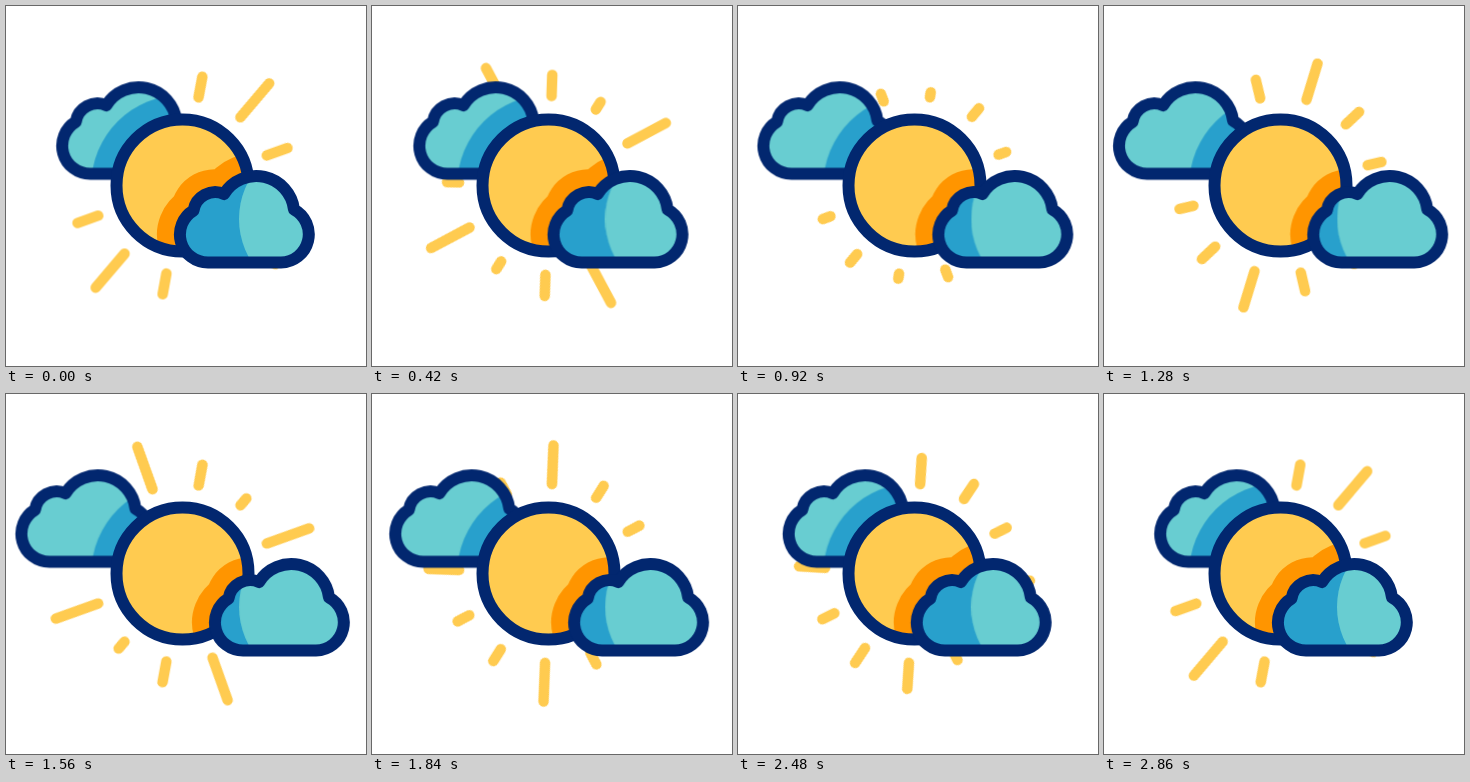
Write an HTML page without scripts that moves like this. It is 360x360 px and loops after 3600 ms.

```html
<!DOCTYPE html>
<html lang="en">
<head>
<meta charset="utf-8">
<title>Partly cloudy</title>
<style>
  html, body { margin: 0; width: 100%; height: 100%; overflow: hidden; background: #fff; }
  svg { display: block; width: 100vw; height: 100vh; }

  .outline { fill: none; stroke: #02276f; stroke-width: 12; stroke-linejoin: round; }
  .ray { stroke: #ffcb50; stroke-width: 10.5; stroke-linecap: round; stroke-dasharray: 50 99; }
  .light { fill: #68cdd1; }
  .blue { fill: #28a0cc; }
  .shade { fill: #ff9500; stroke: #ff9500; stroke-width: 46; stroke-linejoin: round; }

  .spin, .ray, .drift { animation: 3.6s linear infinite; }
  .spin { animation-name: spin; }
  .long { animation-name: long; }
  .far { animation-name: far; }
  .mid { animation-name: mid; }
  .short { animation-name: short; }
  .late { animation-name: late; }
  .drift { animation-name: drift; }
  .right { --x: 36px; }
  .right-back { --x: -36px; }
  .left { --x: -42px; }
  .left-back { --x: 42px; }

  @keyframes drift {
    0% { transform: none; animation-timing-function: cubic-bezier(.35, 0, .65, 1); }
    38.89%, 39.44% { transform: translateX(var(--x)); animation-timing-function: cubic-bezier(.35, 0, .65, 1); }
    77.9%, 100% { transform: none; }
  }
  @keyframes spin {
    0% { transform: rotate(0deg); animation-timing-function: cubic-bezier(.333, .26, .667, .59); }
    11.67% { transform: rotate(21.6deg); animation-timing-function: cubic-bezier(.333, .277, .667, .587); }
    25.56% { transform: rotate(59.5deg); animation-timing-function: cubic-bezier(.333, .305, .667, .692); }
    35.56% { transform: rotate(96.5deg); animation-timing-function: cubic-bezier(.333, .377, .667, .682); }
    43.33% { transform: rotate(120deg); animation-timing-function: cubic-bezier(.333, .385, .667, .774); }
    60% { transform: rotate(161.6deg); animation-timing-function: cubic-bezier(.333, .596, .667, .873); }
    79.44%, 100% { transform: rotate(180deg); }
  }
  /* ray lengths: a larger offset trims the outer end */
  @keyframes long {
    0% { stroke-dashoffset: 5.5; }
    11.67% { stroke-dashoffset: 6.5; }
    15% { stroke-dashoffset: 10; }
    25.56% { stroke-dashoffset: 46; }
    35.56% { stroke-dashoffset: 32; }
    43.33% { stroke-dashoffset: 5; }
    45% { stroke-dashoffset: 4; }
    51% { stroke-dashoffset: 11; }
    60% { stroke-dashoffset: 36; }
    65% { stroke-dashoffset: 42; }
    79.44%, 100% { stroke-dashoffset: 5.5; }
  }
  @keyframes far {
    0% { stroke-dashoffset: 18; }
    11.67% { stroke-dashoffset: 6.5; }
    15% { stroke-dashoffset: 10; }
    25.56% { stroke-dashoffset: 45; }
    35.56% { stroke-dashoffset: 32; }
    43.33% { stroke-dashoffset: 5; }
    60% { stroke-dashoffset: 36; }
    79.44%, 100% { stroke-dashoffset: 18; }
  }
  @keyframes mid {
    0% { stroke-dashoffset: 29; }
    11.67% { stroke-dashoffset: 41; }
    25.56% { stroke-dashoffset: 42; }
    35.56% { stroke-dashoffset: 12; }
    43.33% { stroke-dashoffset: 41; }
    60% { stroke-dashoffset: 32; }
    67% { stroke-dashoffset: 23; }
    79.44%, 100% { stroke-dashoffset: 29; }
  }
  @keyframes short {
    0% { stroke-dashoffset: 28; }
    11.67% { stroke-dashoffset: 38; }
    23% { stroke-dashoffset: 43; }
    35.56% { stroke-dashoffset: 31; }
    43.33% { stroke-dashoffset: 29; }
    60% { stroke-dashoffset: 44; }
    79.44%, 100% { stroke-dashoffset: 28; }
  }
  @keyframes late {
    0% { stroke-dashoffset: 56; }
    11.67% { stroke-dashoffset: 29; }
    25.56% { stroke-dashoffset: 39; }
    35.56% { stroke-dashoffset: 36; }
    60% { stroke-dashoffset: 32; }
    79.44%, 100% { stroke-dashoffset: 56; }
  }
</style>
</head>
<body>
<svg viewBox="0 0 360 360">
  <defs>
    <path id="cloud" d="M202 256.5A28 28 0 0 1 187.5 204.5A22 22 0 0 1 218 188A38 38 0 0 1 288 203.5A28.2 28.2 0 0 1 275 256.5Z"/>
    <clipPath id="in-cloud"><use href="#cloud"/></clipPath>
    <clipPath id="in-sun"><circle cx="176.5" cy="179.5" r="66"/></clipPath>
  </defs>

  <g transform="translate(176.5 179.5)">
    <g class="spin">
      <g transform="rotate(-19.7)">
        <line class="ray mid" x1="89.5" x2="139.5" transform="rotate(-60)"/>
        <line class="ray long" x1="89.5" x2="139.5" transform="rotate(-30)"/>
        <line class="ray short" x1="89.5" x2="139.5"/>
        <line class="ray mid" x1="89.5" x2="139.5" transform="rotate(30)"/>
        <line class="ray far" x1="89.5" x2="139.5" transform="rotate(60)"/>
        <line class="ray late" x1="89.5" x2="139.5" transform="rotate(90)"/>
      </g>
      <g transform="rotate(160.3)">
        <line class="ray mid" x1="89.5" x2="139.5" transform="rotate(-60)"/>
        <line class="ray long" x1="89.5" x2="139.5" transform="rotate(-30)"/>
        <line class="ray short" x1="89.5" x2="139.5"/>
        <line class="ray mid" x1="89.5" x2="139.5" transform="rotate(30)"/>
        <line class="ray far" x1="89.5" x2="139.5" transform="rotate(60)"/>
        <line class="ray late" x1="89.5" x2="139.5" transform="rotate(90)"/>
      </g>
    </g>
  </g>

  <g class="drift left">
    <g transform="translate(-117.7 -88.7)">
      <g clip-path="url(#in-cloud)">
        <use href="#cloud" class="light"/>
        <g class="drift left-back">
          <circle class="blue" cx="293.5" cy="268" r="90.5"/>
        </g>
      </g>
      <use href="#cloud" class="outline"/>
    </g>
  </g>

  <g clip-path="url(#in-sun)">
    <circle cx="176.5" cy="179.5" r="66" fill="#ffcb50"/>
    <g class="drift right"><use href="#cloud" class="shade"/></g>
  </g>
  <circle class="outline" cx="176.5" cy="179.5" r="66"/>

  <g class="drift right">
    <g clip-path="url(#in-cloud)">
      <use href="#cloud" class="blue"/>
      <g class="drift right-back">
        <circle class="light" cx="313" cy="213" r="80"/>
      </g>
    </g>
    <use href="#cloud" class="outline"/>
  </g>
</svg>
</body>
</html>
```
